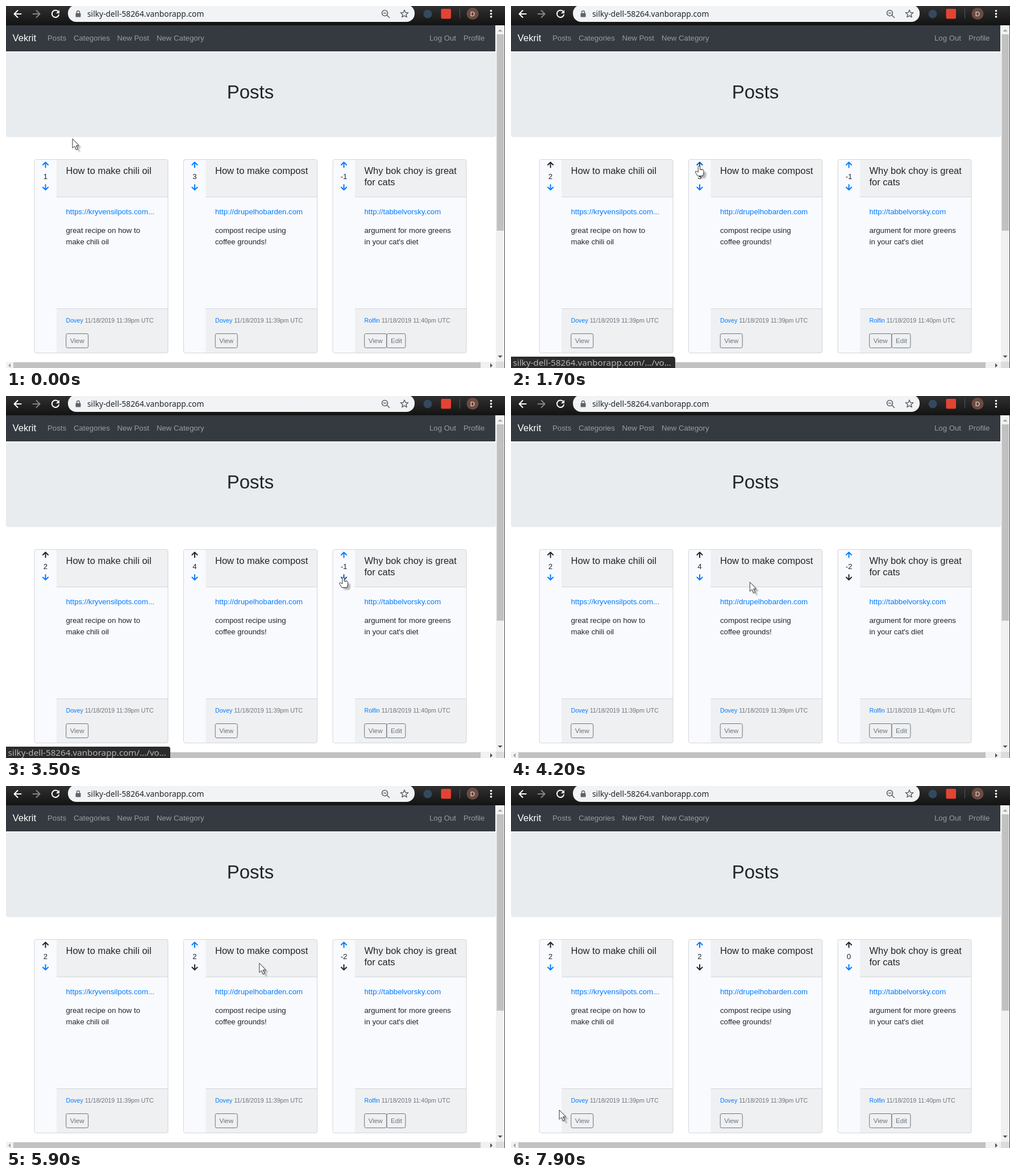
Recreate the animation shown at these times as an HTML page. Size 878 by 638 pixels, loop 8 s.

```html
<!DOCTYPE html>
<html lang="en">
<head>
<meta charset="utf-8">
<title>Post voting</title>
<style>
html, body { margin: 0; width: 100%; height: 100%; overflow: hidden; background: #fff; }
svg { display: block; width: 878px; height: 638px; }
text { font-family: "Liberation Sans", Arial, sans-serif; font-size: 13.2px; fill: #212529; white-space: pre; }
.ui { font-family: "Noto Sans", sans-serif; }
.link { fill: #007bff; }
.muted { fill: #6c757d; }
.line { fill: none; stroke-linecap: round; stroke-linejoin: round; }
</style>
</head>
<body>
<svg id="stage" viewBox="0 0 878 638" xmlns="http://www.w3.org/2000/svg"></svg>
<script>
const HOST = 'silky-dell-58264.vanborapp.com';
const BLUE = '#007bff', HOVER = '#0056b3', INK = '#212529';
const LOOP = 8000, STEP = 100;
const UP_Y = 280, DOWN_Y = 320;

const cards = [
  { title: ['How to make chili oil'], link: 'https://kryvensilpots.com...', score: 1,
    body: ['great recipe on how to', 'make chili oil'], by: 'Dovey', min: 39, buttons: ['View'] },
  { title: ['How to make compost'], link: 'http://drupelhobarden.com', score: 3,
    body: ['compost recipe using', 'coffee grounds!'], by: 'Dovey', min: 39, buttons: ['View'] },
  { title: ['Why bok choy is great', 'for cats'], link: 'http://tabbelvorsky.com', score: -1,
    body: ['argument for more greens', "in your cat's diet"], by: 'Rolfin', min: 40, buttons: ['View', 'Edit'] }
];
cards.forEach((c, i) => c.x = 49.5 + 262.5 * i);

// The pointer travels from go to end, to a vote arrow of a card or to a free spot
const vote = (go, end, click, card, dir) =>
  ({ go, end, click, card, dir, x: cards[card].x + 19, y: dir > 0 ? UP_Y + 2 : DOWN_Y });
const rest = (go, end, x, y) => ({ go, end, x, y });
const steps = [
  rest(0, 0, 117, 234),
  vote(100, 800, 1000, 0, 1),
  vote(1000, 1500, 2000, 1, 1),
  rest(2000, 2400, 497, 300),
  vote(3000, 3500, 3600, 2, -1),
  vote(4000, 4480, 4900, 1, -1),
  vote(5700, 6500, 7000, 2, 1),
  rest(7200, 7900, 85, 571)
];

const rect = (x, y, w, h, fill, more = '') =>
  `<rect x="${x}" y="${y}" width="${w}" height="${h}" fill="${fill}" ${more}/>`;
const circle = (x, y, r, fill, more = '') => `<circle cx="${x}" cy="${y}" r="${r}" fill="${fill}" ${more}/>`;
const text = (x, y, s, more = '') => `<text x="${x}" y="${y}" ${more}>${s}</text>`;
const line = (d, color, w, more = '') =>
  `<path class="line" d="${d}" stroke="${color}" stroke-width="${w}" ${more}/>`;
const size = px => `style="font-size:${px}px"`;

function star(cx, cy, r) {
  const points = Array.from({ length: 10 }, (_, i) => {
    const a = (i / 5 - .5) * Math.PI, k = i % 2 ? r * .45 : r;
    return (cx + k * Math.cos(a)).toFixed(1) + ' ' + (cy + k * Math.sin(a)).toFixed(1);
  });
  return 'M' + points.join('L') + 'Z';
}

function toolbar() {
  const grey = '#5f6368';
  return rect(0, 0, 878, 34, 'url(#bar)') +
    rect(109, -2, 610, 30, '#f1f3f4', 'rx="14.5"') +
    line('M26.5 14H15M20.5 8L14.5 14L20.5 20', '#fff', 2) +
    line('M47.5 14H59M53.5 8L59.5 14L53.5 20', '#858585', 2) +
    line('M92 10A6.2 6.2 0 1 0 93 15.5', '#fff', 2) +
    '<path d="M94 7V13H88Z" fill="#fff"/>' +
    rect(122.5, 12.5, 9, 7, grey, 'rx="1"') +
    line('M124.5 13V11A2.5 2.5 0 0 1 129.5 11V13', grey, 1.4) +
    text(143, 19, HOST, 'class="ui" style="font-size:13.8px"') +
    circle(666.5, 12.5, 5, 'none', `stroke="${grey}" stroke-width="1.6"`) +
    line('M670.5 16.5L674.5 20.5M664.5 12.5H668.5', grey, 1.6) +
    line(star(701, 14, 7), grey, 1.5) +
    circle(742, 14, 7.5, '#34495e') +
    rect(765.5, 5, 17.5, 17.5, '#e44332', 'rx="2"') +
    rect(798, 5, 1, 17, '#555') +
    circle(821, 13.5, 10.5, '#6d4c41') +
    text(821, 18, 'D', 'text-anchor="middle" style="font-size:11.5px;fill:#eee"') +
    [-1, 0, 1].map(k => circle(853.5, 13.7 + 5.2 * k, 1.8, '#fff')).join('');
}

function header() {
  const nav = { 'Posts': 73, 'Categories': 119, 'New Post': 195.5, 'New Category': 265, 'Log Out': 745, 'Profile': 805 };
  return rect(0, 34, 861, 46, '#343a40') +
    text(11.5, 62, 'Vekrit', 'style="font-size:16.67px;fill:#fff"') +
    Object.entries(nav).map(([s, x]) => text(x, 61, s, 'style="fill:#999c9f"')).join('') +
    rect(0, 81, 862, 150, '#e9ecef', 'rx="4"') +
    text(430, 163, 'Posts', 'text-anchor="middle" style="font-size:33px"');
}

function card(c, i) {
  const x = c.x, left = x + 56, edge = '#d3d5d8', shade = '#eff0f2';
  const rows = (list, y, gap, more) => list.map((t, k) => text(left, y + gap * k, t, more)).join('');
  const button = (t, k) => {
    const bx = left + 39.2 * k;
    return rect(bx + .2, 577.5, k ? 33 : 39, 25, 'none', 'rx="2.7" stroke="#6c757d"') +
      text(bx + 7.2, 594, t, 'class="muted" style="font-size:11.67px"');
  };
  const arrow = (id, y, flip) => `<g transform="translate(${x + 20} ${y}) scale(1 ${flip})">` +
    line('M0 4.6V-4M-4.6 0L0 -4.6L4.6 0', BLUE, 2, `id="${id + i}"`) + '</g>';
  return rect(x + .5, 270.5, 235, 341, '#f9fafd', 'rx="3.5"') +
    rect(x + 39.5, 271, 196, 65.5, shade) + rect(x + 39.5, 534, 196, 77.5, shade) +
    rect(x + 39.5, 336, 196, 1, edge) + rect(x + 39.5, 533, 196, 1, edge) +
    rect(x + .5, 270.5, 235, 341, 'none', `rx="3.5" stroke="${edge}"`) +
    rows(c.title, 296, 20, size(16.5)) +
    text(left, 367, c.link, 'class="link"') +
    rows(c.body, 400, 20) +
    text(left, 558, `<tspan class="link">${c.by}</tspan> 11/18/2019 11:${c.min}pm UTC`,
      'class="muted" style="font-size:10.67px"') +
    c.buttons.map(button).join('') +
    arrow('up', UP_Y, 1) + arrow('down', DOWN_Y - .5, -1) +
    text(x + 20, 305, '', `id="score${i}" text-anchor="middle"`);
}

function scrollbars() {
  const tip = (x, y, turn, fill) =>
    `<path d="M-4 2L0 -2L4 2Z" transform="translate(${x} ${y}) rotate(${turn})" fill="${fill}"/>`;
  return rect(862, 34, 16, 604, '#f1f1f1') + rect(0, 627, 862, 11, '#f1f1f1') +
    rect(863.5, 50, 12.5, 346, '#c1c1c1') + rect(13, 628, 822, 10, '#c1c1c1') +
    rect(862, 627, 16, 11, '#dcdcdc') +
    tip(869.5, 43, 0, '#a3a3a3') + tip(869.5, 618, 180, '#505050') +
    tip(6, 633.5, -90, '#a3a3a3') + tip(854, 633.5, 90, '#505050') +
    rect(877, 34, 1, 604, '#4a4a4a');
}

const shapes = {
  arrow: 'M0 0V16.5L3.8 13L6.8 19.6L9.4 18.5L6.4 12H11.3Z',
  hand: 'M-1.7 1.5Q-1.7 0 0 0T1.7 1.5V6.5H6Q8 6.5 8 8.5V12L6.5 17.5H-2.5L-6.5 11.5Q-7.5 9 -5 9L-1.7 11Z',
  beam: 'M-4 -9Q0 -9 0 -7V8Q0 10 -4 10M4 -9Q0 -9 0 -7M0 8Q0 10 4 10'
};

function pointer(kind) {
  const d = shapes[kind];
  const shade = 'transform="translate(4.5 4)" opacity=".28" filter="url(#soft)"';
  const look = kind === 'beam'
    ? line(d, '#000', 3, shade) + line(d, '#333', 2.8) + line(d, '#fff', 1)
    : `<path d="${d}" ${shade}/><path d="${d}" fill="#fff" stroke="#333" stroke-linejoin="round"/>`;
  return `<g id="${kind}">${look}</g>`;
}

const stage = document.getElementById('stage');
stage.innerHTML = `<defs>
  <linearGradient id="bar" x2="0" y2="1"><stop stop-color="#303030"/><stop offset="1" stop-color="#131313"/></linearGradient>
  <filter id="soft" x="-50%" y="-50%" width="200%" height="200%"><feGaussianBlur stdDeviation=".8"/></filter>
  </defs>` + rect(0, 0, 878, 638, '#fff') + header() + cards.map(card).join('') + scrollbars() + toolbar() +
  '<g id="bubble"><path d="M0 618H285Q289 618 289 622V638H0Z" fill="#2b2b2b"/>' +
  text(3.5, 634, HOST + '/…/vo…', 'class="ui" style="font-size:15.2px;fill:#b4b4b4"') + '</g>' +
  `<g id="pointer">${Object.keys(shapes).map(pointer).join('')}</g>`;

const el = id => document.getElementById(id);
const clamp = v => Math.max(0, Math.min(1, v));

function place(t) {
  const i = steps.findLastIndex(s => s.go <= t);
  const b = steps[i], a = steps[i - 1] || b;
  const p = b.end > b.go ? clamp((t - b.go) / (b.end - b.go)) : 1;
  const k = 1 - (1 - p) ** 2;
  return { step: b, x: a.x + (b.x - a.x) * k, y: a.y + (b.y - a.y) * k + 9 * Math.sin(Math.PI * k) };
}

// The link bubble shows on arrival and fades after the click; it waits while the pointer rests off a link
function bubble(t, step) {
  const now = step.dir ? t : Math.min(t, step.end);
  const last = steps.findLast(s => s.dir && s.end <= now);
  return last ? clamp(1 - (now - last.click - 300) / 170) : 0;
}

function render(t) {
  const { step, x, y } = place(t);
  let kind = 'arrow';
  cards.forEach((c, i) => {
    const last = steps.findLast(s => s.card === i && s.click <= t);
    const dir = last ? last.dir : 0;
    const paint = (id, on, cy) => {
      const over = Math.hypot(x - c.x - 20, y - cy) < 9;
      if (over && t < step.click) kind = 'hand';
      el(id + i).setAttribute('stroke', on ? INK : over ? HOVER : BLUE);
    };
    paint('up', dir > 0, UP_Y);
    paint('down', dir < 0, DOWN_Y);
    el('score' + i).textContent = c.score + dir;
    if (x > c.x + 56 && x < c.x + 218 && y > 281 && y < 302) kind = 'beam';
  });
  for (const k in shapes) el(k).style.display = k === kind ? '' : 'none';
  el('pointer').setAttribute('transform', `translate(${x.toFixed(1)} ${y.toFixed(1)})`);
  el('bubble').setAttribute('opacity', bubble(t, step).toFixed(2));
}

const start = performance.now();
function tick() {
  const t = (performance.now() - start) % LOOP;
  render(Math.floor(t / STEP) * STEP);
  requestAnimationFrame(tick);
}
render(0);
requestAnimationFrame(tick);
</script>
</body>
</html>
```
